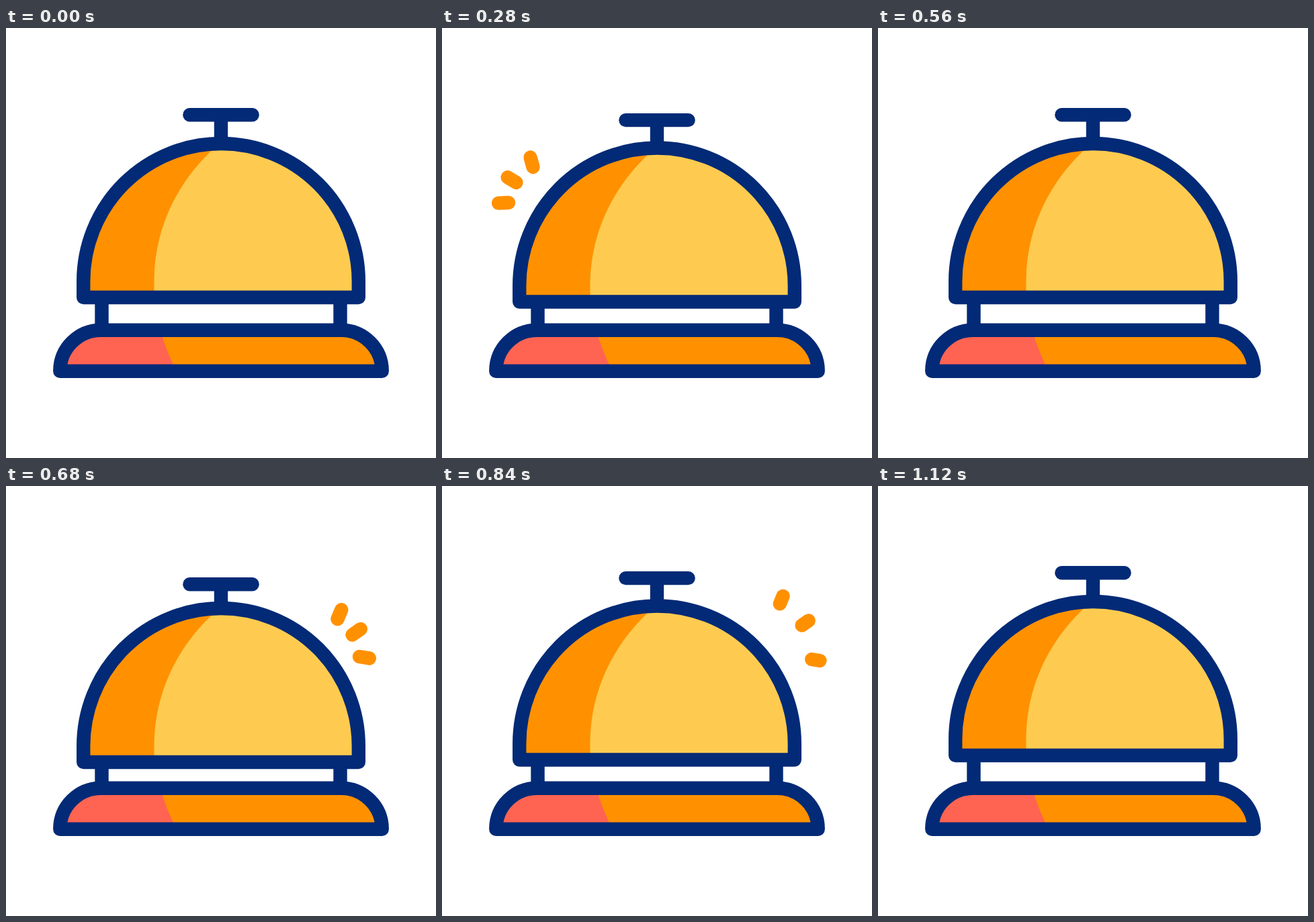
An HTML page for the animation above (1480 ms loop, 640 by 640 pixels).

```html
<!DOCTYPE html>
<html lang="en">
<head>
<meta charset="utf-8">
<title>Desk bell</title>
<style>
  html, body { margin: 0; width: 100%; height: 100%; overflow: hidden; background: #fff; }
  svg { display: block; width: 100%; height: 100%; }
  .ink { fill: none; stroke: #032a76; stroke-width: 20.4; stroke-linejoin: round; }
  .round, #sparks { stroke-linecap: round; }
  #sparks { stroke: #ff9100; stroke-width: 20.4; }
</style>
</head>
<body>
<svg viewBox="0 0 640 640">
  <path class="ink" d="M142.5 385V450M497.5 385V450"/>
  <path fill="#ff9100" d="M80.3 510.7A61 61 0 0 1 141.3 449.7H498.7A61 61 0 0 1 559.7 510.7Z"/>
  <path fill="#ff6351" d="M80.3 510.7A61 61 0 0 1 141.3 449.7H229.5Q238 479 253.5 510.7Z"/>
  <path class="ink" d="M80.3 510.7A61 61 0 0 1 141.3 449.7H498.7A61 61 0 0 1 559.7 510.7Z"/>
  <g id="button">
    <path class="ink" d="M320 129.3V195"/>
    <path class="ink round" d="M273.4 129.3H366.6"/>
  </g>
  <g id="dome">
    <path fill="#ff9100" d="M115.2 401V377A204.8 205 0 0 1 524.8 377V401Z"/>
    <path fill="#fecb50" d="M220.5 401V377C220.5 300 254 229 312 177L320 172A204.8 205 0 0 1 524.8 377V401Z"/>
    <path class="ink" d="M115.2 401V377A204.8 205 0 0 1 524.8 377V401Z"/>
  </g>
  <g id="sparks"></g>
</svg>
<script>
  const LOOP = 1480, RING = 560, STEP = 40, REACH = 38;
  const get = id => document.getElementById(id);

  // Damped bounce: [time, dome offset, button offset]
  const bounce = [
    [40, 0, 0], [120, 10, 17], [190, -11, -20], [260, 9, 11],
    [330, -4.5, -6], [400, 2.5, 4], [470, -1.5, -2], [560, 0, 0]
  ];

  // Each spark: start time, inner end, direction in degrees
  const sparks = [
    [200, 135.5, 207, -105.4], [200, 110.5, 230, 211], [200, 99, 260, 177.5],
    [600, 493.5, 198, -67.6], [600, 515.5, 221.5, -35], [600, 526, 254, 9.3]
  ].map(([start, x, y, angle]) => {
    const line = document.createElementNS(get('sparks').namespaceURI, 'line');
    line.setAttribute('transform', `translate(${x} ${y}) rotate(${angle})`);
    get('sparks').append(line);
    return { start, line };
  });

  const clamp = x => Math.min(1, Math.max(0, x));
  const easeOut = x => 1 - (1 - clamp(x)) ** 1.366;
  const swing = x => (1 - Math.cos(Math.PI * x)) / 2;

  function offset(t, column) {
    const i = bounce.findIndex(key => t < key[0]);
    if (i < 1) return 0;
    const a = bounce[i - 1], b = bounce[i];
    return a[column] + (b[column] - a[column]) * swing((t - a[0]) / (b[0] - a[0]));
  }

  function draw(t) {
    const ring = t < RING ? t : t - RING;
    get('dome').setAttribute('transform', `translate(0 ${offset(ring, 1)})`);
    get('button').setAttribute('transform', `translate(0 ${offset(ring, 2)})`);
    for (const { start, line } of sparks) {
      const age = t - start;
      const tip = REACH * easeOut(age / 260);
      const tail = REACH * easeOut((age - 80) / 300);
      line.setAttribute('x1', tail);
      line.setAttribute('x2', tip);
      line.style.display = tip - tail > 2 ? '' : 'none';
    }
  }

  const begin = performance.now();
  function tick() {
    const t = (performance.now() - begin) % LOOP;
    draw(Math.floor(t / STEP) * STEP);
    requestAnimationFrame(tick);
  }
  tick();
</script>
</body>
</html>
```
